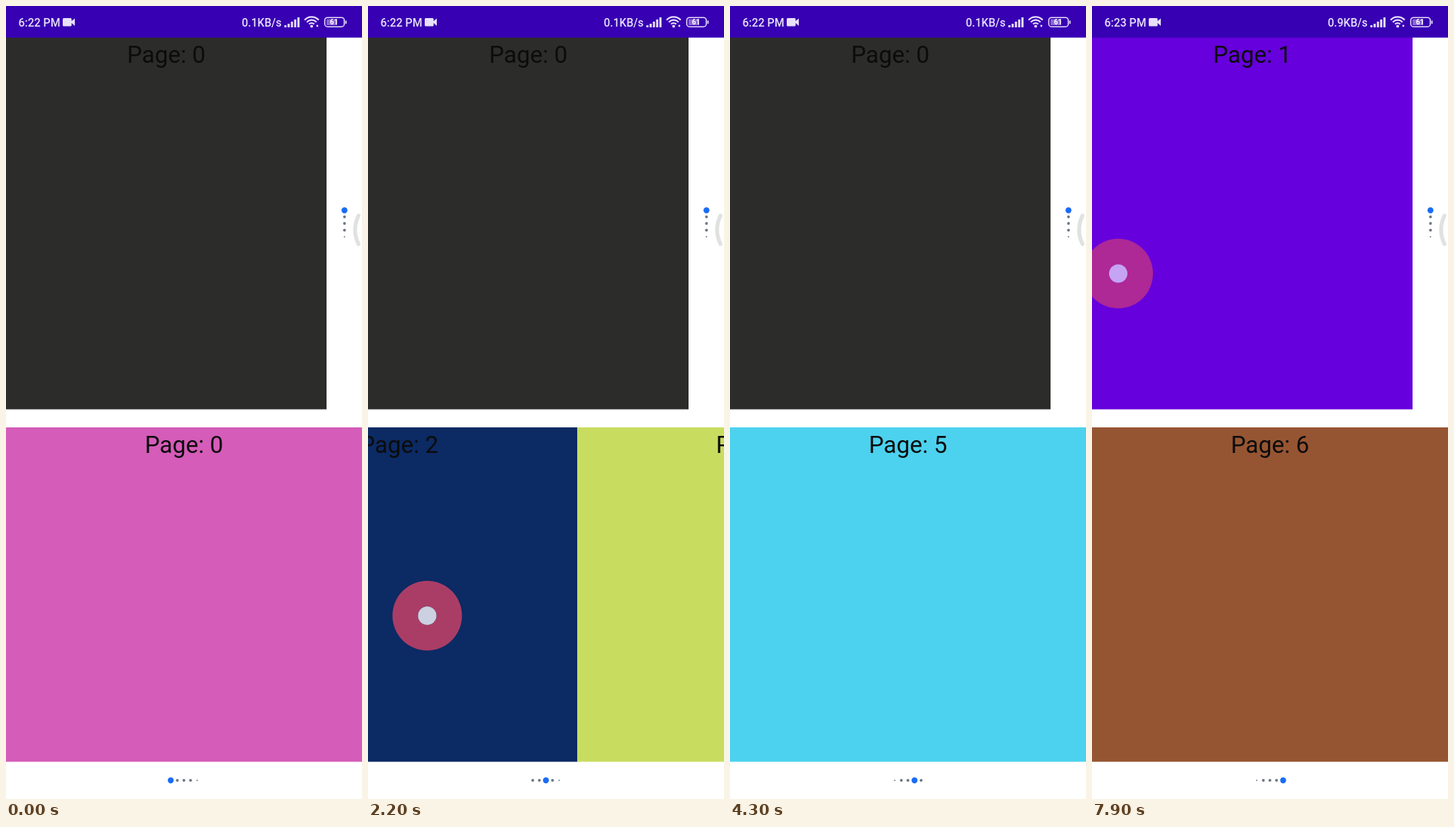
An HTML page with a canvas that plays this animation: 502x1116 px, repeating every 8000 ms.

```html
<!DOCTYPE html>
<html lang="en">
<head>
<meta charset="utf-8">
<title>Pagers</title>
<style>
  html, body { margin: 0; width: 100%; height: 100%; overflow: hidden; background: #fff; }
  canvas { display: block; }
</style>
</head>
<body>
<canvas width="502" height="1116"></canvas>
<script>
const ctx = document.querySelector('canvas').getContext('2d');
const LOOP = 8000;
const STEP = 100;
const ACCENT = '#1a6cf6';
const STATUS = '#e9e0fa';

const topPager = {
  x: 0, y: 44, w: 452, h: 523.6, vertical: true,
  colors: ['#2c2c2a', '#6600dc'],
  dots: { x: 477.3, y: 287.5 },
  // x, y: where the finger lifts; drag: share of a page moved by then
  swipes: [{ down: 7580, up: 7800, end: 7900, drag: 0.3, x: 37, y: 376.5 }]
};
const bottomPager = {
  x: 0, y: 593, w: 502, h: 470.6, vertical: false,
  colors: ['#d55cb8', '#8b5070', '#0c2a63', '#c8dd60', '#07de28', '#4cd2ee', '#965532'],
  dots: { x: 232.3, y: 1089.8 },
  swipes: [
    { down: 100, up: 330, end: 600, drag: 0.25, x: 70, y: 860 },
    { down: 1200, up: 1450, end: 1700, drag: 0.2, x: 60, y: 849 },
    { down: 2050, up: 2170, end: 2430, drag: 0.15, x: 83.5, y: 858 },
    { down: 2850, up: 2950, end: 3100, drag: 0.25, x: 27.5, y: 908 },
    { down: 3760, up: 3880, end: 4100, drag: 0.25, x: 60, y: 880 },
    { down: 5400, up: 5600, end: 5850, drag: 0.25, x: 60, y: 870 }
  ]
};

const clamp = (v, lo = 0, hi = 1) => Math.min(hi, Math.max(lo, v));
const sum = (list, fn) => list.reduce((total, item) => total + fn(item), 0);

function swipeProgress(s, t) {
  if (t < s.up) return s.drag * clamp((t - s.down) / (s.up - s.down)) ** 2;
  const left = 1 - clamp((t - s.up) / (s.end - s.up));
  return 1 - (1 - s.drag) * left ** 3;
}

// A disc, or a ring when an inner radius is given.
function circle(x, y, r, fill, inner = 0) {
  ctx.beginPath();
  ctx.arc(x, y, r, 0, Math.PI * 2);
  if (inner) ctx.arc(x, y, inner, Math.PI * 2, 0, true);
  ctx.fillStyle = fill;
  ctx.fill();
}

function text(str, x, y, font, color, align = 'left') {
  ctx.font = font + ' Roboto, sans-serif';
  ctx.textAlign = align;
  ctx.fillStyle = color;
  ctx.fillText(str, x, y);
}

function drawPages(p, t) {
  const pos = sum(p.swipes, s => swipeProgress(s, t));
  ctx.save();
  ctx.beginPath();
  ctx.rect(p.x, p.y, p.w, Math.ceil(p.h));
  ctx.clip();
  p.colors.forEach((color, i) => {
    const shift = i - pos;
    if (Math.abs(shift) >= 1) return;
    const x = p.x + (p.vertical ? 0 : Math.round(shift * p.w));
    const y = p.y + (p.vertical ? Math.round(shift * p.h) : 0);
    ctx.fillStyle = color;
    ctx.fillRect(x, y, p.w, p.h);
    text('Page: ' + i, x + p.w / 2, y + 35.7, '33.4px', '#0c0c0c', 'center');
  });
  ctx.restore();
}

// Five visible dots over seven pages; selection follows once a page has settled.
function drawDots(p, t) {
  const selected = sum(p.swipes, s => clamp((t - s.end) / 200));
  const first = clamp(selected - 3, 0, 2);
  for (let i = 0; i < 7; i++) {
    const slot = i - first;
    const before = clamp(1 - slot, 0, 2) * Math.min(1, first);
    const after = clamp(slot - 3, 0, 2) * Math.min(1, 2 - first);
    const active = clamp(1 - Math.abs(i - selected));
    const r = 2 * clamp(1 - (before + after) * 0.5) + 2.2 * active;
    if (r < 0.1) continue;
    const x = p.dots.x + (p.vertical ? 0 : slot * 9.3);
    const y = p.dots.y + (p.vertical ? slot * 9.3 : 0);
    circle(x, y, r, active > 0.3 ? ACCENT : '#6d7785');
  }
}

function drawTouch(p, t) {
  for (const s of p.swipes) {
    const since = t - s.up;
    const fade = 0.82 - 0.0022 * since;
    if (t < s.down || fade <= 0) continue;
    const held = since < 0;
    const back = held ? s.drag - swipeProgress(s, t) : 0;
    const x = s.x + (p.vertical ? 0 : back * p.w);
    const y = s.y + (p.vertical ? back * p.h : 0);
    const radius = held ? 28.5 : 28.5 + 20.5 * clamp(since / 30);
    const core = held ? 15 : 13;
    circle(x, y, radius, `rgba(222,68,104,${held ? 0.95 : fade})`, core);
    circle(x, y, core, `rgba(250,250,255,${held ? 0.55 : Math.min(1, fade + 0.05)})`);
    if (held) {
      ctx.strokeStyle = 'rgba(255,225,230,.75)';
      ctx.lineWidth = 1.5;
      ctx.stroke();
    }
  }
}

function drawStatusBar(t) {
  ctx.fillStyle = '#3700b3';
  ctx.fillRect(0, 0, 502, 44.5);
  text(t < 5400 ? '6:22 PM' : '6:23 PM', 17.5, 28.5, '500 15.8px', STATUS);
  text(t < 7400 ? '0.1KB/s' : '0.9KB/s', 332.5, 28.5, '500 15.6px', STATUS);

  // camera
  ctx.beginPath();
  ctx.roundRect(80, 17, 12.5, 11.5, 1.5);
  ctx.moveTo(91, 22.5);
  ctx.lineTo(97, 17.5);
  ctx.lineTo(97, 28);
  ctx.fill();

  // signal
  [3, 5, 8, 11, 14].forEach((h, i) => ctx.fillRect(392.5 + i * 4.6, 30 - h, 3, h));

  // wifi
  ctx.strokeStyle = STATUS;
  ctx.lineWidth = 2.2;
  for (const r of [5, 9.3, 13.6]) {
    ctx.beginPath();
    ctx.arc(431, 29, r, -Math.PI * 0.76, -Math.PI * 0.24);
    ctx.stroke();
  }
  circle(431, 28.5, 2, STATUS);
  circle(439, 28, 1.4, STATUS);

  // battery
  ctx.lineWidth = 1.6;
  ctx.beginPath();
  ctx.roundRect(449.5, 16.2, 27.5, 13, 4);
  ctx.stroke();
  ctx.fillStyle = '#8b68d2';
  ctx.fillRect(452, 18.5, 15, 8.5);
  ctx.fillStyle = STATUS;
  ctx.fillRect(478.5, 20.5, 1.8, 4.5);
  text('61', 462.5, 26.3, 'bold 10px', '#fff', 'center');
}

function drawEdgeHandle() {
  ctx.beginPath();
  ctx.moveTo(497, 295);
  ctx.quadraticCurveTo(487.5, 315, 497, 335);
  ctx.strokeStyle = '#e0e2e0';
  ctx.lineWidth = 5.5;
  ctx.lineCap = 'round';
  ctx.stroke();
  ctx.lineCap = 'butt';
}

function draw(t) {
  ctx.fillStyle = '#fff';
  ctx.fillRect(0, 0, 502, 1116);
  const pagers = [topPager, bottomPager];
  for (const p of pagers) {
    drawPages(p, t);
    drawDots(p, t);
  }
  drawStatusBar(t);
  drawEdgeHandle();
  for (const p of pagers) drawTouch(p, t);
}

// The picture advances in whole steps, like a ten-per-second recording.
const start = performance.now();
function tick() {
  const t = (performance.now() - start) % LOOP;
  draw(Math.floor(t / STEP) * STEP);
  requestAnimationFrame(tick);
}
tick();
</script>
</body>
</html>
```
